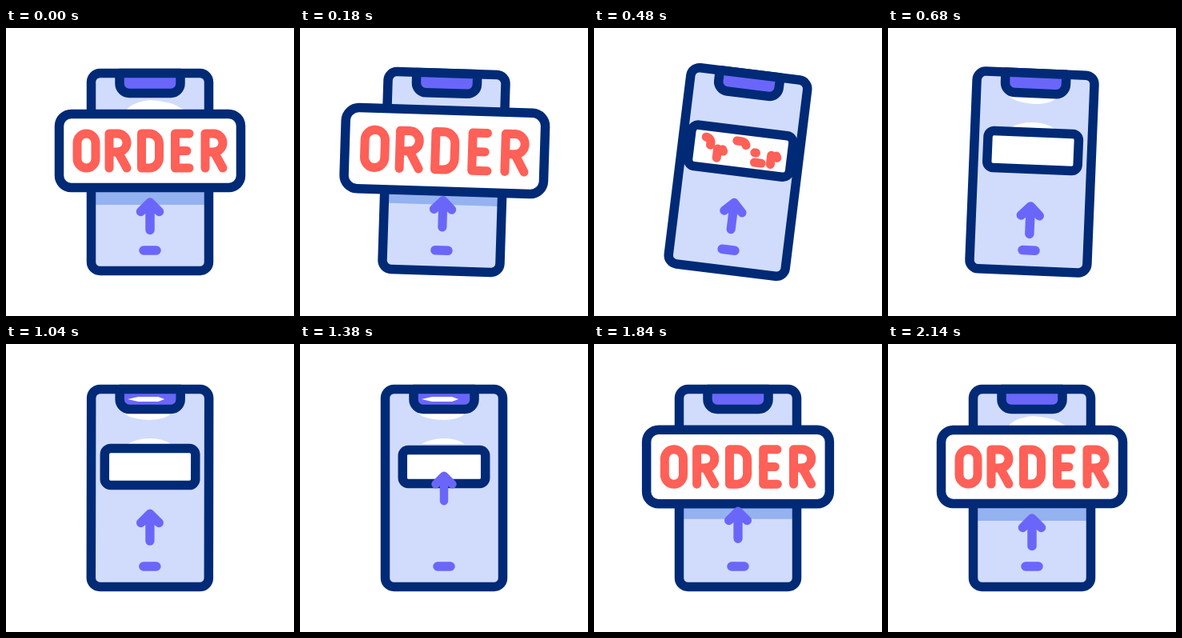
These frames come from a looping animation (360 by 360 pixels, 2.4 s). An HTML page:

```html
<!DOCTYPE html>
<html lang="en">
<head>
<meta charset="utf-8">
<style>
  html, body { margin: 0; width: 100%; height: 100%; overflow: hidden; background: #fff; }
  svg { display: block; width: 100vw; height: 100vh; }
  .line { fill: none; stroke-linecap: round; stroke-linejoin: round; stroke-width: 11.5; }
  .navy { stroke: #002a76; }
  .violet { stroke: #6b66fa; }
  .red { stroke: #ff6057; }
</style>
</head>
<body>
<svg viewBox="0 0 360 360" role="img" aria-label="ORDER">
  <defs>
    <clipPath id="screen"><rect x="106.5" y="56.5" width="147" height="247" rx="11"/></clipPath>
  </defs>
  <g id="phone">
    <rect x="106.5" y="56.5" width="147" height="247" rx="11" fill="#d1dcfc"/>
    <g clip-path="url(#screen)"><rect id="shadow" fill="#94b2f0"/></g>
    <path id="glare" fill="#fff" d="M151 102Q158 93 180 90Q206 91 222 102Z"/>
    <path id="smile" fill="#fff" d="M148 85H208Q202 94 180 95Q156 94 148 87Z"/>
    <path id="bump" fill="#fff" d="M152 125Q164 118 180 118Q196 118 206 125Z"/>
    <rect class="line navy" x="106.5" y="56.5" width="147" height="247" rx="11"/>
    <path class="line navy" style="fill:#6b66fa"
      d="M142 56.5V69.5a12 12 0 0 0 12 12h52a12 12 0 0 0 12-12V56.5Z"/>
    <path id="streak" fill="#fff" d="M152 69L165 66H190L198 69L190 72H165Z"/>
    <path class="line violet" d="M172 278H188"/>
    <rect id="label" class="line navy" style="fill:#fff"/>
    <g id="word" class="line red"></g>
    <g id="arrow" class="line violet"><path d="M180 252.5V218M168.5 229.5L180 218L191.5 229.5"/></g>
  </g>
</svg>
<script>
const LOOP = 2400, CX = 180, LABEL_Y = 153.5;
const el = id => document.getElementById(id);
const [phone, shadow, label, word, arrow] = ['phone', 'shadow', 'label', 'word', 'arrow'].map(el);

// Pen strokes of the word, in drawing order
const letterR = x => [
  `M${x} 175V132H${x + 10.5}a11.5 11.5 0 0 1 0 23H${x}`,
  `M${x + 11} 155L${x + 22} 175`
];
const strokes = [
  'M100.5 132a11.5 11.5 0 0 1 11.5 11.5V163.500a11.5 11.5 0 0 1-23 0V143.500A11.5 11.5 0 0 1 100.5 132',
  ...letterR(129),
  'M169.500 132H179a12.500 12.500 0 0 1 12.500 12.500V162.500A12.500 12.500 0 0 1 179 175H169.500V132',
  'M229 175H211.500V132H229', 'M211.500 153.500H226',
  ...letterR(249)
].map(d => {
  const path = document.createElementNS('http://www.w3.org/2000/svg', 'path');
  path.setAttribute('d', d);
  path.setAttribute('pathLength', 1);
  return word.appendChild(path);
});

// Each track is a list of [time, value] keys joined by sine easing
const tracks = {
  angle: [[0, 0], [550, 7.3], [880, -7.3], [1134, 3.2], [1300, 0]],
  size: [[0, 1], [145, 1.11], [570, .5], [1150, .5], [1400, .455], [1995, 1.11], [2140, 1]],
  depth: [[0, 1], [500, 0], [1400, 0], [2000, 1]],
  ink: [[150, 1], [620, 0], [1460, 0], [1860, 1]],
  lift: [[0, 0], [280, -4], [700, 5], [900, 5], [1400, -55], [2000, 0]],
  arrowSize: [[0, 1], [300, .95], [700, 1], [900, 1], [1400, .91], [2000, 1]]
};

function sample(keys, t) {
  const next = keys.findIndex(key => key[0] > t);
  if (next < 0) return keys[keys.length - 1][1];
  if (next === 0) return keys[0][1];
  const [t0, v0] = keys[next - 1], [t1, v1] = keys[next];
  return v0 + (v1 - v0) * (1 - Math.cos(Math.PI * (t - t0) / (t1 - t0))) / 2;
}

function setBox(node, scale, dy) {
  const w = 227 * scale, h = 92 * scale;
  const box = { x: CX - w / 2, y: LABEL_Y - h / 2 + dy, width: w, height: h, rx: 15 * scale };
  for (const name in box) node.setAttribute(name, box[name]);
}

const scaleAbout = (y, s) => `translate(${CX} ${y}) scale(${s}) translate(${-CX} ${-y})`;
const show = (id, on) => el(id).setAttribute('visibility', on ? 'visible' : 'hidden');

function draw(t) {
  const v = {};
  for (const name in tracks) v[name] = sample(tracks[name], t);

  phone.setAttribute('transform', `rotate(${v.angle} 180 180)`);
  setBox(label, v.size, 0);
  // The shadow extends past the label by the outline plus its own drop
  setBox(shadow, v.size, 5.5 + 16 * v.depth);
  shadow.setAttribute('visibility', v.depth > .01 ? 'visible' : 'hidden');

  word.setAttribute('transform', scaleAbout(LABEL_Y, v.size));
  word.setAttribute('visibility', v.ink > .01 ? 'visible' : 'hidden');
  word.style.strokeWidth = 11 / v.size;
  for (const path of strokes)
    path.setAttribute('stroke-dasharray', v.ink > .995 ? 'none' : `${v.ink} 2`);

  arrow.setAttribute('transform', `translate(0 ${v.lift}) ${scaleAbout(235, v.arrowSize)}`);

  show('glare', t < 20 || t >= 2000);
  show('smile', t > 600 && t < 1640);
  show('bump', t > 600 && t < 1420);
  show('streak', t > 900 && t < 1640);
}

function tick(now) {
  draw(now % LOOP);
  requestAnimationFrame(tick);
}
draw(0);
requestAnimationFrame(tick);
</script>
</body>
</html>
```
